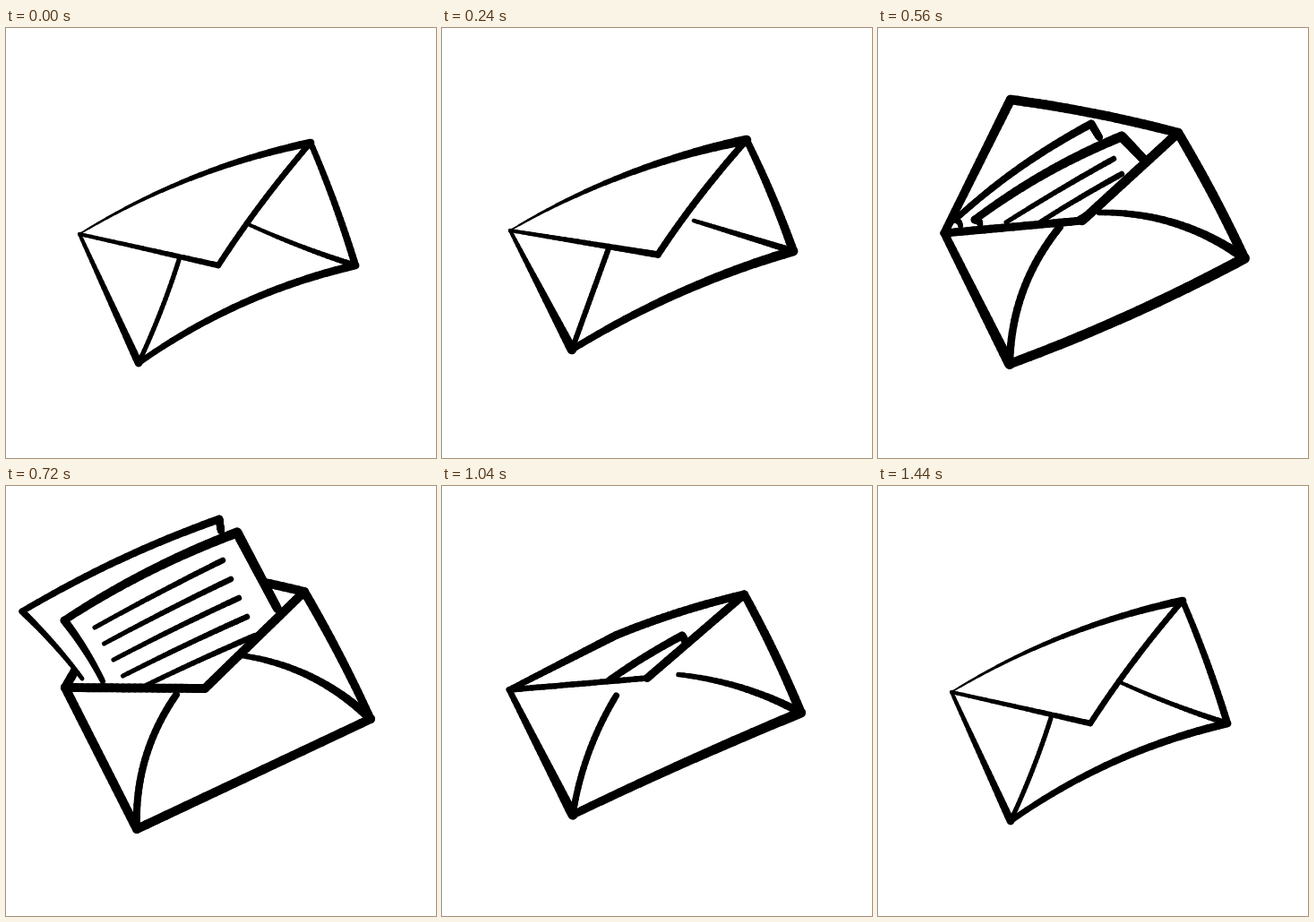
Write an HTML page with a canvas that moves like this. It is 480 by 480 pixels and loops after 1520 ms.

```html
<!DOCTYPE html>
<html>
<head>
<meta charset="utf-8">
<style>
html, body { margin: 0; width: 100%; height: 100%; overflow: hidden; background: #fff; }
canvas { display: block; }
</style>
</head>
<body>
<canvas id="stage" width="480" height="480"></canvas>
<script>
const ctx = document.getElementById('stage').getContext('2d');
ctx.lineCap = 'round';

// Envelope corners and brush weights: closed, raised, open, letter out.
const envelopes = [
  { left: [82, 230], right: [340, 128], notch: [230, 214], tip: [237, 265], baseLeft: [148, 374],
    baseRight: [390, 265], foldLeft: [193, 259], foldRight: [268, 218], arch: 13, curl: -2, thin: 4, thick: 9 },
  { left: [76, 226], right: [340, 125], notch: [230, 214], tip: [241, 253], baseLeft: [145, 359],
    baseRight: [392, 249], foldLeft: [186, 246], foldRight: [281, 215], arch: 9, curl: 0, thin: 4, thick: 11 },
  { left: [74, 229], right: [335, 117], notch: [228, 215], tip: [148, 80], baseLeft: [147, 375],
    baseRight: [409, 257], foldLeft: [203, 222], foldRight: [247, 206], arch: -5, curl: 14, thin: 9, thick: 12 },
  { left: [66, 225], right: [333, 118], notch: [222, 226], tip: [148, 85], baseLeft: [146, 383],
    baseRight: [407, 260], foldLeft: [190, 233], foldRight: [262, 189], arch: 0, curl: 13, thin: 10, thick: 10 }
];

// Sheets run from the lower left corner clockwise; lines start at `line` and advance by `step`.
const letters = [
  { back: [[92, 222], [86, 214], [238, 107], [247, 122]],
    front: [[114, 220], [108, 214], [272, 121], [296, 146]],
    line: [[143, 217], [263, 146]], step: [[28, 6], [9, 17]] },
  { back: [[85, 215], [18, 140], [238, 37], [240, 50]],
    front: [[108, 218], [65, 150], [258, 52], [303, 137]],
    line: [[99, 158], [242, 83]], step: [[10.5, 18], [9, 21]] }
];

function mix(a, b, f) {
  if (typeof a === 'number') return a + (b - a) * f;
  if (Array.isArray(a)) return a.map((v, i) => mix(v, b[i], f));
  return Object.fromEntries(Object.keys(a).map(k => [k, mix(a[k], b[k], f)]));
}

// Samples of a bowed line whose width runs from w0 to w1.
function edge(a, b, bow, w0, w1 = w0) {
  const dx = b[0] - a[0], dy = b[1] - a[1], len = Math.hypot(dx, dy);
  return Array.from({ length: 25 }, (_, i) => {
    const u = i / 24, lift = bow * 4 * u * (1 - u) / len;
    return [a[0] + dx * u + dy * lift, a[1] + dy * u - dx * lift, mix(w0, w1, u)];
  });
}

function brush(samples) {
  for (let i = 1; i < samples.length; i++) {
    const a = samples[i - 1], b = samples[i];
    ctx.lineWidth = b[2];
    ctx.beginPath();
    ctx.moveTo(a[0], a[1]);
    ctx.lineTo(b[0], b[1]);
    ctx.stroke();
  }
}

function paper(...outline) {
  ctx.fillStyle = '#fff';
  ctx.beginPath();
  outline.flat().forEach(([x, y]) => ctx.lineTo(x, y));
  ctx.fill();
  outline.forEach(brush);
}

function drawSheet([start, corner, top, end], w) {
  paper(edge(start, corner, -2, w * 0.6, w * 0.9), edge(corner, top, 6, w * 0.85, w * 1.1), edge(top, end, 0, w * 1.1, w));
}

function drawLetter(p) {
  const { back, front, line, step } = mix(...letters, Math.max(0, p - 2));
  const sunk = Math.max(0, 2 - p) * 120;
  ctx.save();
  ctx.translate(sunk / 2, sunk);
  drawSheet(back, 8);
  drawSheet(front, 10);
  for (let i = 0; i < 5; i++) {
    const [from, to] = line.map((pt, k) => pt.map((v, j) => v + step[k][j] * i));
    brush(edge(from, to, 1, 5, 6.5));
  }
  ctx.restore();
}

function drawPocket(e, mid) {
  paper(
    edge(e.left, e.notch, 0, e.thin),
    edge(e.notch, e.right, 0, mid),
    edge(e.right, e.baseRight, 2, mid, e.thick * 0.9),
    edge(e.baseRight, e.baseLeft, -e.arch, e.thick, mid),
    edge(e.baseLeft, e.left, 0, e.thick, e.thin)
  );
  brush(edge(e.baseLeft, e.foldLeft, e.curl, mid * 0.8));
  brush(edge(e.foldRight, e.baseRight, e.curl, mid * 0.6, mid));
}

function drawEnvelope(p) {
  const i = Math.min(2, Math.floor(p));
  const e = mix(envelopes[i], envelopes[i + 1], p - i);
  const mid = (e.thin + e.thick) / 2;
  const flap = [edge(e.left, e.tip, 0, e.thin, mid), edge(e.tip, e.right, 3, mid)];
  if (p >= 1.5) {
    paper(...flap);
    drawLetter(p);
    drawPocket(e, mid);
  } else {
    drawPocket(e, mid);
    paper(...flap, edge(e.right, e.left, -12, e.thick, e.thin / 2));
  }
}

// Three steps to rise, four to open, two to pull the letter out, then back again.
function progress(step) {
  const d = 9 - Math.abs(9 - step);
  return d < 3 ? d / 3 : d < 7 ? 1 + (d - 3) / 4 : 2 + (d - 7) / 2;
}

function frame() {
  ctx.fillStyle = '#fff';
  ctx.fillRect(0, 0, 480, 480);
  drawEnvelope(progress(Math.floor(performance.now() / 80) % 19));
  requestAnimationFrame(frame);
}
frame();
</script>
</body>
</html>
```
